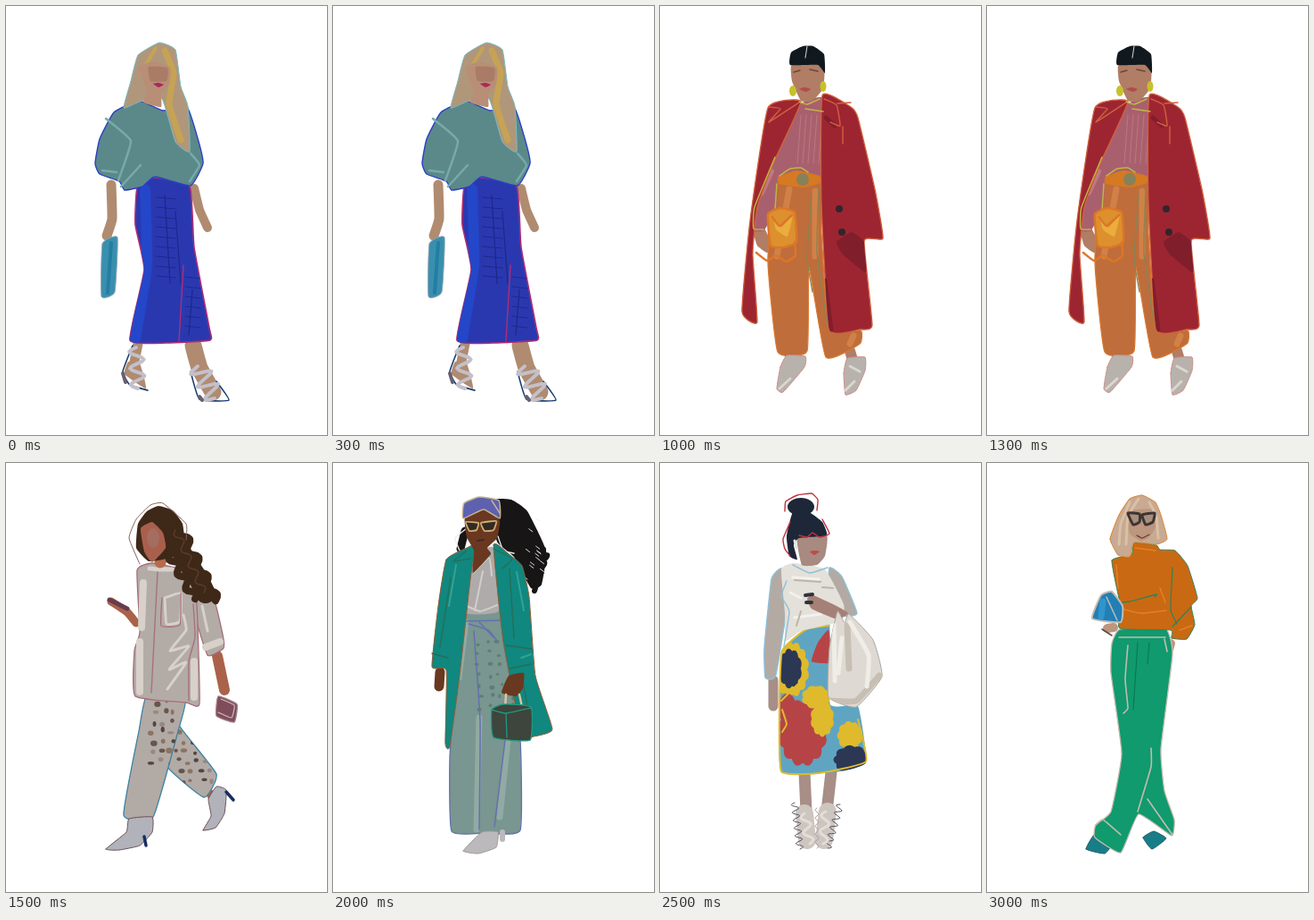
An HTML page with a canvas for the animation above (3500 ms loop, 360x480 px).

```html
<!DOCTYPE html>
<html lang="en">
<head>
<meta charset="utf-8">
<title>Street style sketches</title>
<style>
html, body { margin: 0; height: 100%; overflow: hidden; background: #fff }
canvas { display: block }
</style>
</head>
<body>
<canvas id="stage" width="360" height="480"></canvas>
<script>
const ctx = document.getElementById('stage').getContext('2d');
ctx.lineCap = ctx.lineJoin = 'round';

let seed = 1;
const rand = () => (seed = seed * 16807 % 2147483647) / 2147483647;
const repeat = (n, draw) => { for (let i = 0; i < n; i++) draw(i); };

function stroke(color, width, path) {
  ctx.strokeStyle = color;
  ctx.lineWidth = width;
  ctx.stroke(path);
}

// Slightly softened path through "x,y x,y ..." points.
function trace(text, closed) {
  const pts = text.split(' ').map(p => p.split(',').map(Number));
  const n = pts.length, path = new Path2D(), k = 0.07;
  const at = i => closed ? pts[(i + n) % n] : pts[Math.max(0, Math.min(n - 1, i))];
  path.moveTo(...pts[0]);
  for (let i = 0; i < (closed ? n : n - 1); i++) {
    const [a, b, c, d] = [-1, 0, 1, 2].map(j => at(i + j));
    path.bezierCurveTo(b[0] + (c[0] - a[0]) * k, b[1] + (c[1] - a[1]) * k,
      c[0] - (d[0] - b[0]) * k, c[1] - (d[1] - b[1]) * k, ...c);
  }
  if (closed) path.closePath();
  return path;
}

// Filled shape with an optional pen outline.
function shape(color, points, pen, width = 1.3) {
  const path = trace(points, true);
  ctx.fillStyle = color;
  ctx.fill(path);
  if (pen) stroke(pen, width, path);
}

const line = (color, width, ...paths) => paths.forEach(p => stroke(color, width, trace(p)));

// Sine stroke from one point to another.
function wave(color, width, x0, y0, x1, y1, swing, turns) {
  const path = new Path2D(), steps = turns * 8;
  const dx = x1 - x0, dy = y1 - y0, length = Math.hypot(dx, dy);
  for (let i = 0; i <= steps; i++) {
    const t = i / steps, s = swing * Math.sin(t * turns * 2 * Math.PI) / length;
    path.lineTo(x0 + dx * t - dy * s, y0 + dy * t + dx * s);
  }
  stroke(color, width, path);
}

function dot(color, x, y, rx, ry = rx) {
  ctx.fillStyle = color;
  ctx.beginPath();
  ctx.ellipse(x, y, rx, ry, 0, 0, 7);
  ctx.fill();
}

function flower(color, x, y, rx, ry, petals) {
  ctx.fillStyle = color;
  ctx.beginPath();
  for (let a = 0; a < 6.28; a += 0.05) {
    const r = 0.9 + 0.12 * Math.abs(Math.sin(a * petals / 2));
    ctx.lineTo(x + rx * r * Math.cos(a), y + ry * r * Math.sin(a));
  }
  ctx.fill();
}

function inside(points, draw) {
  ctx.save();
  ctx.clip(trace(points, true));
  draw();
  ctx.restore();
}

// Jittered rows of spots, sheared by slant per row.
function spots(colors, x, y, cols, rows, step, size, slant) {
  repeat(cols * rows, i => {
    const row = Math.floor(i / cols);
    dot(colors[i % colors.length], x + (i % cols + rand() * .5) * step + row * slant,
      y + (row + rand() * .5) * step, size * (.6 + rand() * .6), size * (.5 + rand() * .5));
  });
}

function blueSkirt() {
  const skin = '#b08b70', navy = '#2c3fc4', strap = '#c3c0c9';
  line(skin, 11, '118,200 119,238 113,257', '148,378 143,403');
  line(skin, 10, '211,204 217,228 226,248');
  line(skin, 19, '210,380 217,405 232,432');
  shape(skin, '137,398 150,400 157,428 133,412');
  const skirt = '147,204 165,192 206,202 211,270 228,360 229,374 180,377 139,374 155,295 145,245';
  shape('#2a38b0', skirt, '#af2e74', 1.6);
  inside(skirt, () => {
    line('#2446c8', 12, '156,205 158,290 145,372');
    line('#1c288c', 1.3, '178,212 184,310', '190,230 196,310', '209,318 205,368');
    repeat(9, i => line('#1c288c', 1, `168,${214 + i * 11} 190,${216 + i * 11}`));
    repeat(6, i => line('#1c288c', 1, `201,${303 + i * 11} 218,${305 + i * 11}`));
  });
  line('#af2e74', 1.4, '199,290 194,375');
  shape('#5b8989', '121,119 149,106 176,117 203,113 215,148 221,176 207,201 167,191 153,202 133,206 127,196 105,188 100,176 105,149', navy, 1.4);
  line('#77aaab', 2.5, '112,126 140,151 126,195', '129,202 151,178', '207,165 217,178 206,196', '108,184 124,186');
  shape('#b0977b', '148,55 172,41 190,49 196,90 204,112 206,163 190,152 175,104 150,107 132,114 140,84', '#79bac2', 1);
  line('#c6a354', 7, '178,50 188,75 183,110 196,150');
  line('#c6a354', 4, '168,47 153,72');
  shape('#b98e76', '149,69 165,62 184,69 183,88 174,98 174,113 154,108 158,97');
  shape('#aa7c68', '160,68 181,69 180,84 162,84');
  shape('#ab285f', '165,87 171,86 177,88 171,91');
  shape('#398fae', '108,266 125,259 122,320 107,325', '#92a3b4', 1);
  line('#247da2', 4, '118,265 114,321');
  line('#183a70', 1.6, '142,380 131,409 139,424 159,430', '207,409 217,440 250,441 236,420');
  wave(strap, 4, 146, 382, 148, 428, 8, 2.5);
  wave(strap, 4, 215, 403, 234, 439, 11, 2.5);
  line('#666071', 4, '131,411 134,421', '217,437 220,441');
}

function printedTunic() {
  const skin = '#5f321e', teal = '#7eb9ca', lilac = '#a397e9', ink = '#393836';
  line(skin, 7, '124,235 125,263', '203,338 206,402');
  line(skin, 11, '208,192 204,218 199,248');
  const leg = '#8e86dc';
  shape(leg, '128,230 162,225 166,335 177,412 136,414 136,335', teal);
  shape(leg, '162,226 196,212 194,247 203,405 200,422 186,420 180,330 168,310', teal);
  shape(leg, '200,318 207,338 219,423 210,423', teal);
  line(teal, 1.7, '157,360 159,326 166,312', '181,307 198,304 196,311 183,310 208,315');
  const top = '139,110 179,107 191,96 217,97 226,135 241,192 211,187 213,207 181,216 160,229 117,228 130,197 107,194 132,126';
  shape('#a8a09d', top, lilac);
  inside(top, () => {
    line('#c3bcb5', 11, '156,112 148,155', '154,168 140,196', '121,224 134,209', '224,165 232,190');
    repeat(5, i => {
      wave(ink, 1.4, 182 + i * 5, 104, 164 + i * 4, 158, 3, 2);
      wave(ink, 1.4, 177 + i * 6, 148 - i * 5, 212 + i * 5, 178 - i * 2, 2.5, 2);
      wave(ink, 1.6, 144 - i * 2, 136 + i * 7, 119, 152 + i * 5, 2, 1);
      line(ink, 1.8, `${160 + i * 4},206 ${165 + i * 4},190 ${178 + i * 3},${181 + i * 3} ${184 + i * 4},${188 + i * 3}`);
    });
    wave(ink, 1.6, 139, 180, 145, 200, 3, 1);
  });
  line(lilac, 2, '163,105 177,107 190,96 205,97 188,139 168,162 168,172 240,192', '168,162 145,162 130,197 153,202 168,172', '151,201 177,206 193,213');
  shape('#86b7c4', '198,211 212,209 213,220 200,221');
  shape(skin, '153,55 164,50 185,54 188,75 183,101 173,104 165,102 166,91 152,67');
  shape('#2d1b17', '152,66 158,44 169,40 180,44 186,55 169,56 158,70');
  line('#d9c9bf', 1.4, '162,66 164,59 185,53', '153,54 156,44 165,40');
  line('#351d17', 1.3, '164,68 172,69', '179,68 186,67', '173,87 183,87');
  shape('#78a7b2', '122,429 139,416 163,415 148,426', '#634b45', 1);
  shape('#78a7b2', '190,430 195,407 210,402 211,432 200,438', '#634b45', 1);
  line('#634b45', 1, '162,416 164,425');
}

function redCoat() {
  const skin = '#b17d65', rust = '#d0623e', orange = '#dc7627', olive = '#beb842';
  line(skin, 12, '148,388 148,394', '213,386 216,396');
  shape(skin, '104,249 117,249 127,270 120,276 109,268');
  shape('#be6d3b', '131,196 180,197 181,255 190,362 225,363 224,378 186,393 167,292 165,386 132,387 121,285', '#d97830');
  line('#d18148', 7, '145,205 131,280', '174,207 174,280', '217,369 213,378');
  line('#888454', 1.3, '170,210 165,282 171,320', '178,203 176,276 187,353');
  shape('#a9606e', '155,112 184,104 184,193 160,186 133,196 131,222 117,251 104,251 106,226 122,186');
  line('#be7984', 6, '125,185 114,209');
  repeat(5, i => line('#bd7880', 1, `${158 + i * 6},122 ${154 + i * 6},176`));
  const coat = '#9d2531';
  shape(coat, '121,114 158,107 128,174 109,225 104,278 109,354 92,342 101,240', rust);
  const front = '182,100 214,113 222,125 241,205 250,260 229,263 238,357 224,362 190,362 181,220';
  shape(coat, front, rust);
  inside(front, () => {
    shape('#801e2c', '198,264 215,253 231,266 231,298 205,278');
    line('#801e2c', 5, '186,125 196,134', '185,307 192,362');
  });
  line(rust, 1.4, '122,113 135,115 122,130 156,108', '184,104 198,111 202,134 191,130', '205,135 205,154', '199,109 214,108');
  shape('#d57922', '133,191 153,184 179,190 179,198 161,203 133,199');
  dot('#86815a', 160, 194, 7);
  line(olive, 1.5, '134,190 146,182 158,181 166,186', '129,169 106,225 105,249 116,250', '131,199 129,229', '156,107 165,110 179,104', '163,115 183,118');
  shape('#dc902e', '121,233 135,226 151,231 153,264 139,270 124,268', orange, 2.5);
  shape('#ebad3d', '127,235 136,248 149,233 143,258 130,250');
  line(orange, 2.5, '126,236 134,246 148,234', '108,276 120,285 130,279 142,286 152,279 151,264');
  shape(skin, '147,67 160,62 184,64 183,92 171,106 158,106 148,84');
  shape('#11191f', '146,66 147,52 160,45 172,45 184,54 185,75 177,66');
  line('#e8e4df', 1, '165,45 163,58');
  line('#66483b', 1.4, '150,74 157,72', '168,71 177,73');
  shape('#b24b4c', '156,93 162,91 169,93 164,96');
  dot('#c7c12d', 149, 95, 4, 6);
  dot('#c7c12d', 183, 90, 3.5, 6);
  dot('#30262b', 201, 227, 4);
  dot('#30262b', 204, 253, 4);
  shape('#b8b2ac', '135,404 142,391 163,392 162,404 138,432 131,428', '#ce8d8c', 1);
  shape('#b8b2ac', '206,411 210,394 230,393 230,408 220,430 208,435', '#ce8d8c', 1);
  line('#dcd6cf', 3, '134,428 146,417', '213,403 224,409', '208,430 218,420');
}

function longShirt() {
  const skin = '#aa624b', cloth = '#b3aba6', pale = '#d7d1ca', rose = '#a66e7c', denim = '#3d82a4', hair = '#3e2818';
  line(skin, 9, '118,155 136,167 146,179', '226,366 230,372');
  line(skin, 12, '237,216 245,254');
  line('#693b4c', 5, '116,153 136,163');
  const back = '196,266 193,292 236,348 222,374 179,337 180,270';
  const front = '158,260 201,264 193,300 165,396 132,394 149,300';
  const prints = ['#66564e', '#8b7464', '#514742', '#9a8780'];
  shape('#b2aaa5', back, denim);
  inside(back, () => spots(prints, 180, 298, 4, 6, 11, 3.2, 3));
  shape('#b2aaa5', front, denim);
  inside(front, () => spots(prints, 165, 265, 3, 7, 11, 3.2, -1));
  shape(cloth, '209,158 232,150 243,192 244,207 226,215', rose);
  shape(cloth, '147,120 163,112 190,117 207,121 214,159 217,269 202,268 145,261 144,210 150,189', rose);
  line(pale, 8, '154,134 152,184', '150,200 150,256', '224,206 240,200', '211,222 211,262');
  line(pale, 5, '161,118 171,119 186,119');
  line(pale, 3, '178,151 196,146 195,177 180,180 178,151', '199,170 202,187 184,210 205,205 183,231 202,223 181,253', '220,160 226,188');
  line(rose, 1.3, '170,122 163,257', '175,151 174,182 195,181 196,146', '210,158 212,195 205,222 205,266');
  line('#b9694c', 13, '177,98 173,111');
  shape(hair, '146,95 148,68 158,54 171,48 187,53 198,68 200,92 184,106 160,110');
  line(hair, 22, '187,80 200,106 216,130 224,146');
  wave(hair, 8, 194, 72, 235, 154, 5, 4);
  wave(hair, 8, 184, 102, 212, 152, 4, 3);
  wave('#5a3b28', 1.5, 190, 75, 222, 145, 4, 4);
  shape('#a8604d', '151,73 164,66 176,78 179,95 164,111 155,99');
  dot('#a46d60', 165, 84, 7, 11);
  line('#82645b', 1, '150,113 138,84 146,63 162,47 176,45 202,68 202,86');
  shape('#7f4d5a', '238,261 259,270 256,290 236,283', '#a58088');
  line('#d2bcc0', 1.2, '241,264 256,271 253,285 238,279');
  shape('#b2b2bb', '112,432 135,413 138,398 164,396 164,413 150,428 127,433', '#6b5056', 1);
  shape('#b2b2bb', '221,411 230,395 227,376 236,362 247,366 245,392 235,408', '#6b5056', 1);
  line('#152f63', 3.5, '155,418 157,428', '247,368 255,377');
}

function tealCoat() {
  const hair = '#171515', skin = '#6a3820', coat = '#10877f', seam = '#286d57', edge = '#8e5d35', blue = '#6371ae';
  shape(hair, '178,42 200,41 218,54 239,98 234,136 222,140 203,105 184,88');
  repeat(5, i => wave(hair, 6, 196 + i * 3, 46 + i * 4, 226 + i * 3, 143 - i * 9, 4, 3 + i));
  repeat(14, () => {
    const x = 214 + rand() * 20, y = 58 + rand() * 75;
    line('#efede9', 1, `${x},${y} ${x + 4},${y + 3}`);
  });
  line(hair, 9, '148,76 143,96');
  line('#efede9', 1.4, '150,73 137,84 142,98', '185,82 191,98 203,101');
  line(skin, 11, '120,234 119,250');
  const trousers = '147,167 186,164 196,200 210,310 210,411 171,414 133,412 131,330 138,230';
  shape('#799690', trousers, blue);
  inside(trousers, () => {
    line('#91aaa4', 7, '149,178 141,240', '164,285 161,410', '197,300 187,396');
    spots(['#5e7f70'], 157, 198, 4, 7, 12, 2.6, 1);
  });
  line(blue, 1.5, '145,177 193,176', '152,180 174,187 184,199', '164,178 180,195', '158,188 165,290 164,410', '194,302 181,407');
  shape('#afabaa', '154,111 179,94 187,165 147,167');
  line(pale = '#d1cecb', 2, '158,122 175,106 178,126', '168,121 159,165', '150,160 165,166 184,159');
  shape(coat, '127,108 150,95 160,92 154,130 142,238 131,317 126,314 127,232 111,228 118,160', edge, 1);
  shape(coat, '180,92 196,101 212,115 220,150 227,238 246,298 225,306 212,305 191,200', edge, 1);
  line(seam, 1.3, '150,98 135,110 154,107', '132,128 120,206', '111,213 129,218', '180,96 201,107 190,118', '198,119 203,196', '194,204 223,208', '198,230 222,225', '212,239 218,274 211,302');
  line('#32a294', 2, '138,114 130,160', '206,122 214,165', '211,218 222,214');
  shape(skin, '148,61 170,50 187,64 184,84 173,95 177,102 157,123 158,98 150,83');
  shape('#5d61ae', '146,62 147,45 164,38 186,42 187,62 169,52', '#c5b391', 1.5);
  line('#c5b391', 1.5, '178,42 187,56');
  for (const lens of ['149,66 163,67 161,75 153,76', '166,67 183,65 180,75 170,76'])
    shape('#302b26', lens, '#d1af72', 1.8);
  line('#452920', 2, '162,87 169,86');
  shape(skin, '197,238 214,235 213,252 205,261 189,257');
  line('#dac5a1', 2.5, '193,274 194,259', '209,259 212,273');
  shape('#3d453c', '178,276 191,270 222,273 221,310 180,307', '#229982');
  line('#229982', 1.3, '178,276 194,280 222,274', '194,280 195,307');
  shape('#bbb9bc', '146,434 167,413 185,413 183,430 163,437', '#a09ba0', 1);
  line('#bbb9bc', 6, '190,413 190,421');
}

function floralSkirt() {
  const skin = '#a78e86', yellow = '#dfba2c', red = '#b64447', navy = '#2c3754', sky = '#8bc1d7', hair = '#1d2738';
  line(skin, 11, '127,243 127,272');
  line(skin, 13, '162,346 164,390', '192,346 187,390');
  const skirt = '137,211 164,186 190,181 191,270 222,272 231,335 196,346 136,345 134,270';
  shape('#5fa5c2', skirt);
  inside(skirt, () => {
    flower(yellow, 147, 231, 20, 31, 13);
    flower(navy, 146, 230, 13, 22, 9);
    shape(red, '170,222 177,201 189,187 193,223');
    flower(red, 160, 302, 27, 37, 12);
    dot(red, 143, 275, 10, 17);
    flower(yellow, 175, 262, 16, 13, 8);
    flower(yellow, 182, 286, 13, 20, 10);
    flower(yellow, 213, 305, 14, 16, 9);
    flower(navy, 215, 332, 20, 16, 9);
  });
  line(yellow, 2, '190,182 164,186 137,210 134,270 136,345 178,347 231,334 222,287', '136,266 154,248', '137,276 142,292 137,301');
  shape('#b3aaa4', '125,130 136,118 146,135 130,237 118,240 117,206', sky);
  shape('#b3aaa4', '190,117 204,127 221,168 206,171 189,151', sky);
  shape('#e4e0da', '136,119 150,112 185,119 206,158 203,177 158,188 141,199 140,167');
  line('#f3f1ed', 3, '149,128 178,130', '146,145 158,151', '151,173 181,169');
  line('#bdb4a8', 2, '151,131 180,133', '158,166 153,182', '182,139 194,140');
  line(sky, 1.4, '142,132 136,149 145,166 139,205', '149,114 168,123 188,117');
  shape('#a58076', '165,152 172,148 198,160 211,168 199,175 170,163');
  line('#30323a', 4, '163,148 171,147', '164,156 170,156');
  const bag = '199,166 207,179 212,169 239,198 249,239 220,273 189,262 190,207';
  shape('#dedad3', bag, '#aaa59d', 1);
  inside(bag, () => {
    line('#c8bfb4', 7, '210,182 212,230', '192,266 220,266 246,238');
    line('#f0ede7', 5, '195,181 196,244', '213,178 234,215 232,250', '204,196 200,235');
  });
  shape('#a98a80', '154,83 187,81 185,104 176,114 159,114');
  dot(hair, 158, 49, 15, 10);
  shape(hair, '149,55 167,55 182,66 187,81 156,84 150,92 154,108 145,104 142,82');
  line('#e8e5e1', 3, '151,87 153,95');
  line('#bf303d', 1.4, '140,54 141,43 154,36 170,34 177,41 176,53', '146,66 138,85 140,96 146,104', '156,81 165,83 171,78 179,83 190,79 182,63');
  shape('#bc4c46', '168,99 174,98 179,99 173,103');
  line('#cdc5c0', 20, '162,392 165,422');
  line('#cdc5c0', 20, '188,390 184,422');
  wave('#54525c', 1, 151, 380, 157, 432, 4, 6);
  wave('#54525c', 1, 202, 382, 188, 431, 4, 6);
  wave('#a9a1a0', 1, 176, 386, 176, 431, 2, 5);
  wave('#e3dcd7', 3, 162, 392, 168, 426, 5, 2);
  wave('#e3dcd7', 3, 186, 390, 183, 426, 5, 2);
}

function greenTrousers() {
  const skin = '#bd967f', pen = '#c3bbb0', leaf = '#348254', hair = '#c8aa92';
  line(skin, 10, '135,185 142,184', '206,202 204,209');
  line('#594b45', 1.5, '129,186 140,193');
  shape('#177e87', '111,432 122,414 140,426 132,437', '#275e70', 1);
  shape('#177e87', '175,419 187,412 201,420 185,432', '#275e70', 1);
  shape('#109a6d', '149,186 200,185 208,214 195,320 199,367 210,399 207,417 170,393 150,436 121,419 122,405 139,390 151,325 139,235 140,202', pen);
  line(pen, 1.6, '148,195 200,195', '158,204 155,242 158,274 153,280', '184,319 184,340 169,390', '122,405 130,399 150,416', '180,376 208,416', '199,197 202,211');
  line('#077451', 1, '182,201 180,225', '169,201 164,276');
  shape('#ca6913', '140,109 162,103 165,89 190,92 194,97 211,98 225,115 236,151 229,160 233,181 224,197 207,196 206,187 149,185 149,157', leaf, 1);
  line('#e28125', 1.5, '166,95 189,98', '145,114 147,140', '151,163 172,168 201,165', '194,140 200,156', '216,187 230,182');
  line(leaf, 1.3, '147,156 160,155 190,147 188,150', '208,117 206,164 213,180', '229,161 208,183');
  shape('#227fb6', '118,174 128,148 140,144 152,160 150,178', pen, 2);
  line('#3195cc', 7, '130,155 128,172');
  line(pen, 1.5, '134,150 146,176');
  shape(hair, '138,85 148,58 160,40 174,36 189,44 195,58 202,85 190,91 165,89 160,105 147,103', '#d9832e', 1);
  shape(skin, '157,54 185,52 189,72 181,84 172,87 160,79');
  line('#dac0a5', 3, '160,44 150,68 148,91', '170,40 158,60 156,91', '182,44 190,60 192,84');
  for (const lens of ['158,56 171,57 171,66 164,69', '174,58 188,56 186,66 178,69'])
    shape('#a68f80', lens, '#3e3531', 3);
  line('#6c3d34', 1.3, '168,81 174,84 182,80');
}

const looks = [blueSkirt, printedTunic, redCoat, longShirt, tealCoat, floralSkirt, greenTrousers];
const hold = 500;
let shown = -1;

function tick() {
  const current = Math.floor(performance.now() / hold) % looks.length;
  if (current !== shown) {
    shown = current;
    seed = 7;
    ctx.clearRect(0, 0, 360, 480);
    looks[current]();
  }
  requestAnimationFrame(tick);
}
tick();
</script>
</body>
</html>
```
